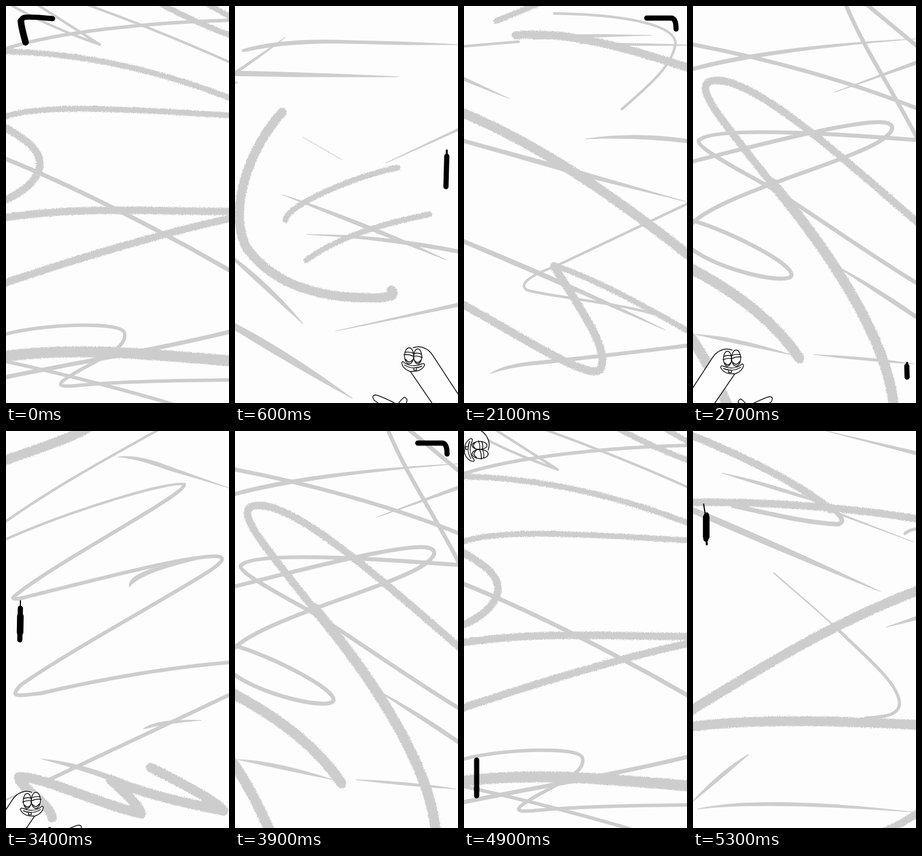
Recreate the animation shown at these times as an HTML page without scripts. Size 388x690 px, loop 5400 ms.

```html
<!DOCTYPE html>
<html lang="en">
<head>
<meta charset="utf-8">
<title>Scribble loop</title>
<style>
html,body{margin:0;width:100%;height:100%;overflow:hidden;background:#fdfdfd}
svg{display:block;width:388px;height:690px}
path,ellipse{stroke-linecap:round;stroke-linejoin:round}

/* scribbles: six drawings, 200 ms each */
.s{--w:6;fill:none;stroke:#cdcdcd;visibility:hidden;animation:four 5.4s step-end infinite;animation-delay:calc(var(--n)*.2s - 5.4s)}
.s.five{animation-name:five}
.s path{stroke-width:var(--w)}
.rough{filter:url(#rough)}
.s .taper{fill:#cdcdcd;stroke-width:1.2}
@keyframes five{
  0%,22.222%,44.444%,66.666%,88.888%{visibility:visible}
  3.703%,25.925%,48.148%,70.37%,92.592%{visibility:hidden}
}
@keyframes four{
  0%,22.222%,44.444%,66.666%{visibility:visible}
  3.703%,25.925%,48.148%,70.37%,100%{visibility:hidden}
}

/* black mark: 18 poses per lap of the border */
.m{fill:none;stroke:#000;stroke-width:9;visibility:hidden;animation:pose 1.8s step-end infinite;animation-delay:calc(var(--k)*.1s - 1.8s)}
.m .thin{stroke-width:3.5}
.m .hair{stroke-width:2}
.m .fat{stroke-width:11.5}
@keyframes pose{0%{visibility:visible}5.555%,100%{visibility:hidden}}

/* peeking worm */
.ink{fill:none;stroke:#111;stroke-width:1.4}
.skin{fill:#fefefe}
.body{fill:#fefefe;stroke:none}
.head,.hand{animation:head 5.4s step-end infinite;animation-delay:calc(var(--t) - 5.4s)}
.hand{animation-name:hand}
@keyframes head{
  0%{transform:translate(-75px,110px)}
  1.851%{transform:translate(-40px,60px)}
  3.703%{transform:none}
  5.555%{transform:translate(10px,-4px)}
  7.407%{transform:translate(15px,-23px)}
  16.666%{transform:translate(-23px,30px)}
  18.518%{transform:translate(-35px,50px)}
  20.37%{transform:translate(-45px,68px)}
  22.221%{transform:translate(-52px,86px)}
  24.07%,100%{transform:translate(-200px,300px)}
}
@keyframes hand{
  0%{transform:translate(0,60px)}
  1.851%{transform:translate(0,30px)}
  3.703%{transform:none}
  5.555%{transform:translate(10px,-3px)}
  7.407%{transform:translate(-7px,-48px)}
  16.666%{transform:translate(-7px,6px)}
  18.518%,100%{transform:translate(0,90px)}
}
</style>
</head>
<body>
<svg viewBox="0 0 388 690">
<defs>
  <filter id="rough" filterUnits="userSpaceOnUse" x="-10" y="-10" width="408" height="710" color-interpolation-filters="sRGB">
    <feTurbulence type="fractalNoise" baseFrequency=".6" numOctaves="2" seed="4"/>
    <feDisplacementMap in="SourceGraphic" scale="6" xChannelSelector="R" yChannelSelector="G"/>
  </filter>
  <g id="stick">
    <path class="thin" d="M0-34V-20"/>
    <path d="M0-24V28"/>
  </g>
  <g id="head" class="ink">
    <path class="body" d="M-84 790L0 663L33 612C45 593 72 591 83 606L84 628L72 640L-30 790Z"/>
    <path d="M-84 790L0 663L34 611C43 597 58 594 68 598M73 639L38 690L-30 790"/>
    <ellipse class="skin" cx="60" cy="613" rx="7" ry="13"/>
    <ellipse class="skin" cx="75" cy="612" rx="8" ry="14"/>
    <path d="M52 615Q60 611 67 613Q75 609 84 610M54 609Q60 606 66 608Q75 604 82 606"/>
    <path d="M55 620Q60 627 66 620M69 619Q75 627 81 618"/>
    <path class="skin" d="M48 628Q49 624 53 626Q68 633 82 625Q86 620 88 624Q87 634 74 639Q54 641 48 628Z"/>
    <path d="M53 630Q68 637 83 628M62 634V637H67V634"/>
  </g>
  <g id="hand" class="ink">
    <path class="skin" d="M81 684Q77 687 80 693Q86 697 85 704Q85 714 90 719Q98 726 112 724Q120 722 121 714Q125 708 118 701L136 688Q141 680 134 679Q129 679 102 692Q98 695 96 698Q92 690 86 685Q83 682 81 684Z"/>
    <path d="M96 698Q96 703 101 705"/>
  </g>
</defs>
<rect width="388" height="690" fill="#fdfdfd"/>

<g class="s five" style="--n:0">
  <path d="M8-2C60 28 120 52 163 67M55-2L163 67M142-2C230 30 310 62 390 98" style="--w:4.5"/>
  <path d="M0 74C90 45 250 28 390 25M0 570C70 552 200 548 206 568C212 590 180 605 130 632C80 660 90 662 120 660C200 652 300 651 390 650M0 618C80 635 200 665 290 692"/>
  <path d="M0 266C110 310 260 385 390 460M0 645C120 620 260 598 390 566" style="--w:7.5"/>
  <g class="rough" style="--w:10">
    <path d="M272-2C310 18 350 36 390 51M350-4L390 19M0 79C130 82 260 110 390 160M0 192C70 168 250 182 390 190"/>
    <path d="M-4 368C130 348 250 357 392 357M-4 482C120 440 270 395 392 369M-4 210C35 232 60 250 59 275C58 300 30 325-4 338" style="--w:13"/>
    <path d="M-4 609C120 592 250 605 392 617" style="--w:19"/>
  </g>
</g>

<g class="s five" style="--n:1">
  <path class="taper" d="M-2 107Q130 70 388 57Q130 78-2 113ZM246 150L390 95V101ZM5 571Q70 573 170 606Q80 588 5 571ZM210 606Q300 609 384 622Q300 617 210 606ZM246 450Q320 488 390 538V545Z"/>
  <path d="M0 67C130 92 270 130 390 178M303-2L390 70M266-2C300 80 350 150 390 230M0 270C100 245 280 198 330 202C365 206 340 230 300 248C220 285 40 333-4 380M390 233C250 222 30 208 10 234C5 250 130 310 150 325C220 370 320 440 390 482M0 373C60 390 180 450 171 469C162 485 50 460 0 424" style="--w:7"/>
  <g class="rough" style="--w:13">
    <path d="M392 377C300 300 130 140 50 130C10 125 15 150 49 195C76 232 110 275 140 312"/>
    <path d="M138 308C240 430 338 580 349 694M-4 456C70 495 140 545 185 612M-4 576Q30 625 60 694" style="--w:18"/>
  </g>
</g>

<g class="s five" style="--n:2">
  <path class="taper" d="M50 73Q150 93 232 128Q140 102 50 73ZM240 137L384 193L250 144ZM-2 132Q150 195 326 279Q150 210-2 142ZM232 0L390 36V42ZM97 562Q50 588-2 645Q40 612 97 562ZM8 657Q120 632 380 662Q120 643 8 657ZM336 341L390 322V328Z"/>
  <path d="M141 247C190 290 225 319 255 348" style="--w:2.5"/>
  <path d="M250 343C300 392 354 435 359 470C362 495 330 497 300 499M369 178Q378 171 390 170" style="--w:5.5"/>
  <path d="M235 130Q272 157 252 162C200 160 140 145 70 130" style="--w:8"/>
  <g class="rough" style="--w:13">
    <path d="M-4 7C90 45 180 88 240 137M-4 124C130 122 260 132 392 153M330 697Q360 685 392 663"/>
    <path d="M-4 486C120 410 250 330 392 277M-4 514C100 500 250 503 392 511" style="--w:17"/>
  </g>
</g>

<g class="s" style="--n:3">
  <path class="taper" d="M12 76Q80 55 200 60Q300 62 388 67Q300 68 200 65Q90 62 14 80ZM-2 115L87 55Q40 92-2 120ZM-2 113Q140 116 284 123Q140 124-2 121ZM83 328Q230 375 367 441Q220 385 83 328ZM125 397Q260 397 390 424V430Q260 405 125 397ZM118 228L186 267ZM262 273L390 212V216ZM-2 437Q60 482 118 552Q60 500-2 442ZM175 565L390 516V522ZM-2 551Q90 598 204 682Q100 625-2 562ZM-2 131L5 133L-2 135Z"/>
  <g class="rough" style="--w:10">
    <path d="M283 281C220 292 90 345 88 372M338 362C270 375 180 400 124 442"/>
    <path d="M82 185C30 240-15 350 20 420C70 490 160 510 250 507Q284 505 272 494" style="--w:16"/>
  </g>
</g>

<g class="s" style="--n:4">
  <path class="taper" d="M120 52Q220 48 326 51Q220 54 120 58ZM200 65Q300 64 390 68Q290 70 200 65ZM-2 123L79 161L-2 129ZM211 231Q300 218 390 232V238Q300 227 211 231ZM46 639Q70 622 130 617Q250 605 390 587V593Q250 610 130 623Q80 627 46 639ZM-2 405Q180 478 350 563Q180 490-2 412ZM-2 231L200 286L386 340L190 292L-2 237Z"/>
  <path d="M157 13C290 15 370 35 368 66C362 105 320 140 275 179M0 70L95 62M390 343L160 452C110 470 95 485 110 494C150 505 260 515 330 535" style="--w:4.5"/>
  <g class="rough" style="--w:10">
    <path d="M56 26L130-4M392 566C320 525 230 475 160 452"/>
    <path d="M90 51C180 42 290 75 392 108M157 452C190 510 260 600 236 633C210 650 60 550-4 518" style="--w:14"/>
    <path d="M-4 185C130 240 260 330 392 434" style="--w:17"/>
  </g>
</g>

<g class="s" style="--n:5">
  <path class="taper" d="M195 45Q230 40 290 64L388 99L280 67Q230 48 195 45ZM239 518Q260 500 340 503Q280 507 239 518ZM62 570Q130 577 190 602L186 609Q130 588 62 570ZM215 271Q208 242 330 224Q230 248 215 271Z"/>
  <path d="M0 157C80 100 180 45 265-2M0 188C120 135 290 85 310 93" style="--w:4.5"/>
  <path d="M310 93C312 110 120 210 30 275C10 290 5 293 25 291C150 260 320 215 370 218C394 223 340 252 300 276C200 335 90 396 25 442C5 465 20 460 60 456C170 430 290 410 390 402M390 458L75 606" style="--w:6.5"/>
  <path d="M0 641L40 623" style="--w:3"/>
  <g class="rough" style="--w:17">
    <path d="M-4 52C50 32 110 15 146-8M80 672C80 650 24 620 22 602C60 598 150 645 235 665Q232 650 182 606C250 635 330 650 378 660Q372 645 252 585"/>
  </g>
</g>

<g transform="matrix(-1 0 0 1 388 0)" style="--t:.3s"><use href="#hand" class="hand"/><use href="#head" class="head"/></g>
<g style="--t:2.5s"><use href="#hand" class="hand"/><use href="#head" class="head"/></g>
<g transform="translate(690 0) rotate(90)" style="--t:3.9s"><use href="#hand" class="hand"/><use href="#head" class="head"/></g>

<g class="m" style="--k:0"><path d="M81 22C60 20 40 18 31 20Q24 23 27 34"/><path class="fat" d="M26 26Q26 34 34 63"/></g>
<g class="m" style="--k:1"><use href="#stick" transform="translate(135 20) rotate(-90)"/></g>
<g class="m" style="--k:2"><use href="#stick" transform="translate(245 21) rotate(-90)"/></g>
<g class="m" style="--k:3"><path d="M318 21H360Q369 21 369 40"/></g>
<g class="m" style="--k:4"><use href="#stick" transform="translate(369 108)"/></g>
<g class="m" style="--k:5"><use href="#stick" transform="translate(368 194)"/></g>
<g class="m" style="--k:6"><path class="thin" d="M368.500 251V262"/><path d="M368.500 261L367 314"/></g>
<g class="m" style="--k:7"><use href="#stick" transform="translate(370 396)"/></g>
<g class="m" style="--k:8"><path class="thin" d="M372.500 484V494"/><path d="M373 493V537"/></g>
<g class="m" style="--k:9"><path class="thin" d="M372.500 620V626"/><path d="M372 626L372.500 645"/></g>
<g class="m" style="--k:10"><use href="#stick" transform="translate(270 668) rotate(90)"/></g>
<g class="m" style="--k:11"><use href="#stick" transform="translate(160 668) rotate(90)"/></g>
<g class="m" style="--k:12"><path d="M66 668H32Q23 668 23 648"/></g>
<g class="m" style="--k:13"><use href="#stick" transform="translate(22 600) rotate(180)"/></g>
<g class="m" style="--k:14"><use href="#stick" transform="translate(22 510) rotate(180)"/></g>
<g class="m" style="--k:15"><path d="M22 391L21 434"/><path class="fat" d="M21.500 400L20.500 430"/><path class="thin" d="M21 434L20.500 452"/></g>
<g class="m" style="--k:16"><path class="hair" d="M25 295V306"/><path d="M25 308L24 363"/><path class="fat" d="M25 322L24.500 350"/></g>
<g class="m" style="--k:17"><path class="hair" d="M18.500 127L21 143"/><path d="M23.500 146L22.500 188"/><path class="fat" d="M23 150V184"/><path class="thin" d="M23 186L24 197"/></g>
</svg>
</body>
</html>
```
